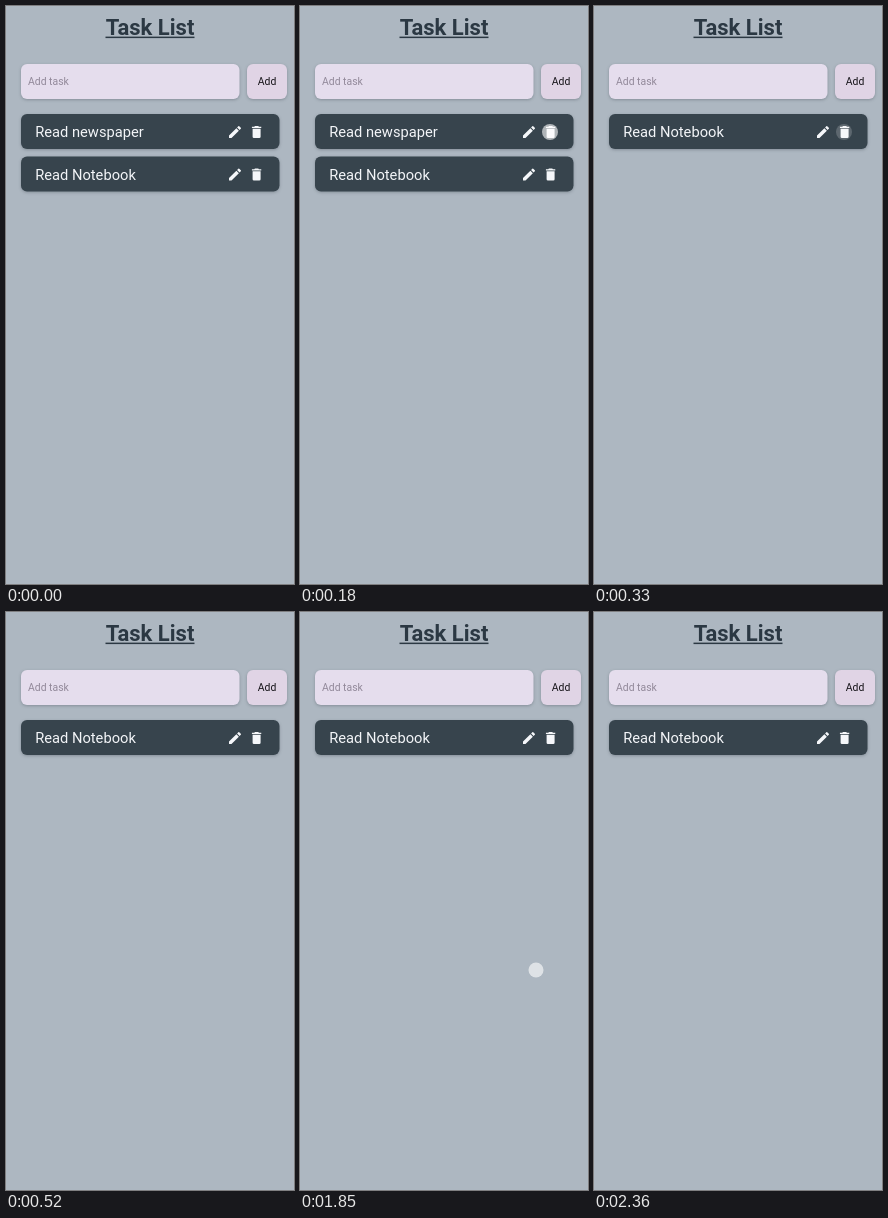
Animation, 288 px wide and 578 px high, one loop 2.39 s. Source, as an HTML page:

```html
<!DOCTYPE html>
<html lang="en">
<head>
<meta charset="utf-8">
<title>Task List</title>
<style>
  :root { --loop: 2390ms; }
  html, body { margin: 0; width: 100%; height: 100%; overflow: hidden; background: #adb7c1; }
  svg { display: block; width: 100%; height: 100%; }
  text { font-family: Roboto, sans-serif; }

  .title { font-size: 22px; font-weight: 700; fill: #2b3843; text-anchor: middle; }
  .rule { fill: #2b3843; }
  .field { fill: #e5dded; }
  .button { fill: #e0d4e5; }
  .hint { font-size: 10.4px; fill: #92899a; }
  .label { font-size: 10.4px; fill: #17151a; text-anchor: middle; }
  .card { fill: #37444d; }
  .name { font-size: 14.7px; fill: #f3f5f8; }
  .icon { fill: #f5f7fa; }
  .raised { filter: drop-shadow(0 1px 1.5px rgba(40, 50, 60, .3)); }

  .removed { animation: remove var(--loop) step-end infinite; }
  .kept { animation: shift var(--loop) step-end infinite; }
  .touch { fill: #fff; opacity: 0; }
  .delete { animation: tap-delete var(--loop) linear infinite; }
  .blank { animation: tap-blank var(--loop) linear infinite; }

  /* 8.787% = 210 ms */
  @keyframes remove {
    0% { visibility: visible; }
    8.787%, 100% { visibility: hidden; }
  }
  @keyframes shift {
    0% { transform: translateY(42.5px); }
    8.787%, 100% { transform: translateY(0); }
  }
  /* 90 to 350 ms */
  @keyframes tap-delete {
    0%, 3.76% { opacity: 0; }
    3.77%, 12.13% { opacity: .6; }
    14.64%, 100% { opacity: 0; }
  }
  /* 1850 to 2110 ms */
  @keyframes tap-blank {
    0%, 77.39% { opacity: 0; }
    77.4%, 85.77% { opacity: .6; }
    88.28%, 100% { opacity: 0; }
  }
</style>
</head>
<body>
<svg viewBox="0 0 288 578" preserveAspectRatio="none">
  <defs>
    <g id="row">
      <rect class="card raised" x="15" y="108" width="258.5" height="35" rx="6"/>
      <g class="icon">
        <path transform="translate(221 118) scale(.6667)" d="M3 17.25V21h3.75L17.81 9.94l-3.75-3.75L3 17.25zM20.71 7.04a1 1 0 0 0 0-1.41l-2.34-2.34a1 1 0 0 0-1.41 0l-1.83 1.83 3.75 3.75 1.83-1.83z"/>
        <path transform="translate(242.6 118) scale(.6667)" d="M6 19a2 2 0 0 0 2 2h8a2 2 0 0 0 2-2V7H6v12zM19 4h-3.5l-1-1h-5l-1 1H5v2h14V4z"/>
      </g>
    </g>
  </defs>

  <rect width="288" height="578" fill="#adb7c1"/>

  <text class="title" x="144" y="28.8">Task List</text>
  <rect class="rule" x="99.5" y="30.6" width="89" height="1.5"/>

  <rect class="field raised" x="15" y="58" width="218.5" height="35" rx="6"/>
  <text class="hint" x="22" y="79.4">Add task</text>
  <rect class="button raised" x="241" y="58" width="40" height="35" rx="6"/>
  <text class="label" x="261" y="79.4">Add</text>

  <g class="removed">
    <use href="#row"/>
    <text class="name" x="29.2" y="131.3">Read newspaper</text>
  </g>
  <g class="kept">
    <use href="#row"/>
    <text class="name" x="29.2" y="131.3">Read Notebook</text>
  </g>

  <circle class="touch delete" cx="250" cy="126" r="8"/>
  <circle class="touch blank" cx="236" cy="358" r="7.5"/>
</svg>
</body>
</html>
```
